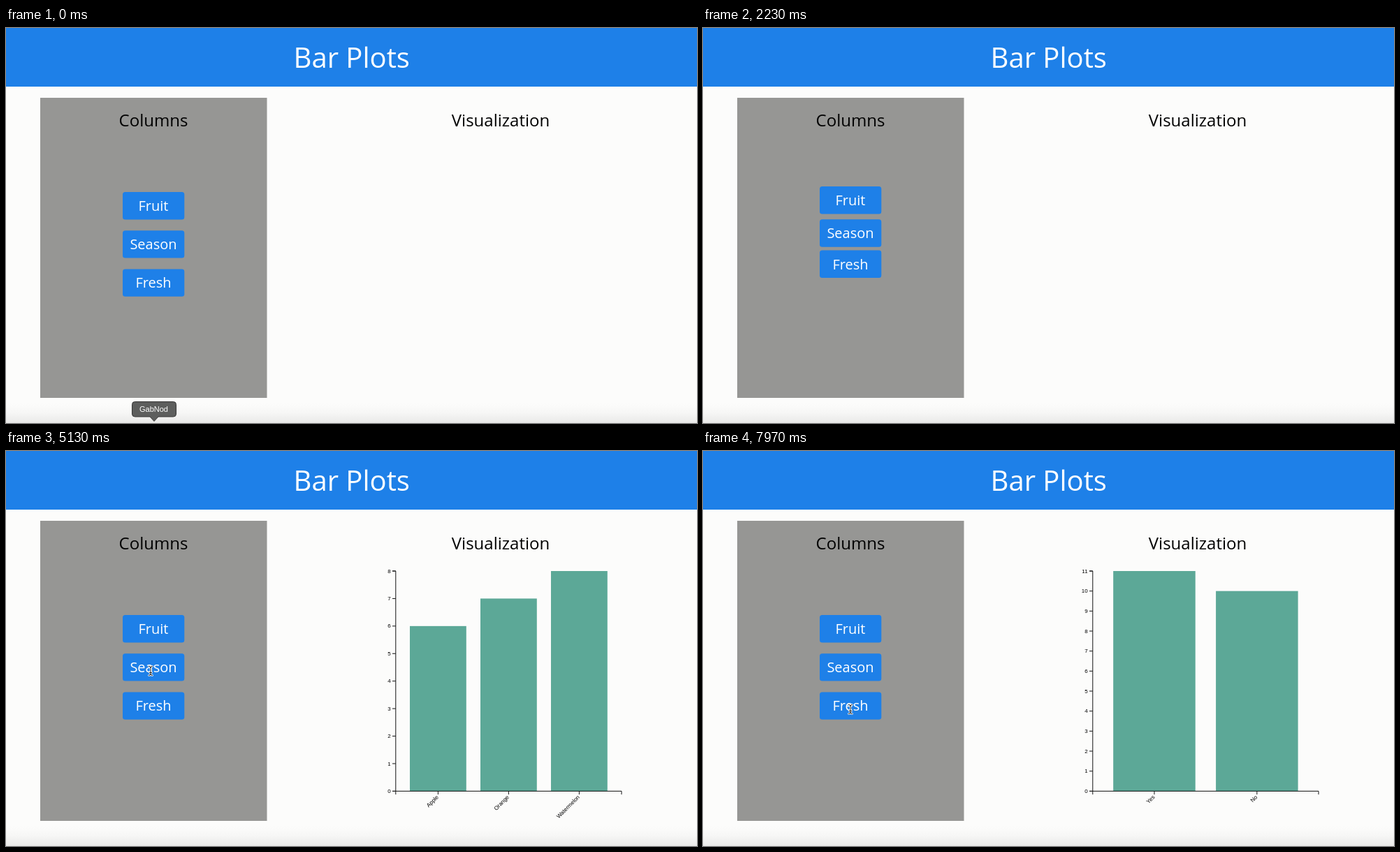
Animation, 989 px wide and 566 px high, one loop 8 s. Source, as an HTML page:

```html
<!DOCTYPE html>
<html lang="en">
<head>
<meta charset="utf-8">
<title>Bar Plots</title>
<style>
  html, body { margin: 0; width: 100%; height: 100%; overflow: hidden; background: #fcfcfb; }
  svg { display: block; width: 989px; height: 566px; }
  text { font-family: "Open Sans", "Noto Sans", sans-serif; text-anchor: middle; }
  .button text { font-size: 20px; fill: #fff; }
  .button rect { fill: #1e80e8; }
  .heading { font-size: 24px; }
  .system text, .chart text { font-family: "Liberation Sans", Arial, sans-serif; }
  .chart text { font-size: 8px; text-anchor: end; }
  .chart path { fill: none; stroke: #111; stroke-width: 1; }
  .chart rect { fill: #5ca897; }
</style>
</head>
<body>
<svg viewBox="0 0 989 566">
  <defs>
    <linearGradient id="floor" x2="0" y2="1">
      <stop offset="0" stop-color="#fcfcfb"/>
      <stop offset=".45" stop-color="#f7f7f6"/>
      <stop offset="1" stop-color="#e9e9e8"/>
    </linearGradient>
    <filter id="shadow" x="-10%" y="-100%" width="120%" height="300%">
      <feDropShadow dx="0" dy="0" stdDeviation="4" flood-opacity=".35"/>
    </filter>
  </defs>
  <rect width="989" height="566" fill="#fcfcfb"/>
  <rect y="538" width="989" height="28" fill="url(#floor)"/>
  <rect width="989" height="84" fill="#1e80e8"/>
  <text x="494.7" y="57" font-size="40" fill="#fff">Bar Plots</text>
  <rect x="49" y="100" width="324.5" height="430" fill="#969694"/>
  <text class="heading" x="211" y="141">Columns</text>
  <text class="heading" x="708" y="141">Visualization</text>
  <g id="buttons"></g>
  <g id="charts"></g>
  <g id="tooltip" class="system">
    <path d="M184.5 535.5H239.500a4 4 0 0 1 4 4V553a4 4 0 0 1 -4 4H218L212 563.500L206 557H184.500a4 4 0 0 1 -4 -4V539.500a4 4 0 0 1 4 -4Z" fill="#5d5e5d" stroke="#363636"/>
    <text x="211.5" y="550" font-size="11" fill="#fff">GabNod</text>
  </g>
  <g id="status" class="system">
    <path d="M-5 551.500H325a4 4 0 0 1 4 4V570H-5Z" fill="#17191d" filter="url(#shadow)"/>
    <text x="3" y="564" font-size="10" fill="#fff" style="text-anchor:start">Establishing secure connection...</text>
  </g>
  <g id="cursor">
    <g id="beam" fill="none" stroke-linecap="round">
      <path d="M-2.500 -6.500Q0 -6.500 0 -4.500Q0 -6.500 2.500 -6.500M0 -4.500V4.500M-2.500 6.500Q0 6.500 0 4.500Q0 6.500 2.500 6.500M-1.500 2.500H1.500" stroke="#fff" stroke-width="2.600"/>
      <path d="M-2.500 -6.500Q0 -6.500 0 -4.500Q0 -6.500 2.500 -6.500M0 -4.500V4.500M-2.500 6.500Q0 6.500 0 4.500Q0 6.500 2.500 6.500M-1.500 2.500H1.500" stroke="#222" stroke-width="1"/>
    </g>
    <path id="arrow" d="M0 0V13L3 10.200L5 15L7.200 14L5.200 9.500H9.300Z" fill="#000" stroke="#fff"/>
  </g>
</svg>
<script>
const LOOP = 8000;
const RELOAD = 1000;
const DROP = { start: 1718, length: 750, stagger: 100, distance: 79 };
const LABELS = ['Fruit', 'Season', 'Fresh'];
const CHARTS = [
  { from: 3550, to: 5250, bars: { Apple: 6, Orange: 7, Watermelon: 8 } },
  { from: 5250, to: 7300, bars: { Spring: 13, Summer: 8 } },
  { from: 7300, to: LOOP, bars: { Yes: 11, No: 10 } }
];
// time, x, y
const CURSOR = [
  [0, 212, 585], [30, 212, 575], [750, 85, -20], [2430, 500, -20], [2560, 492, 44],
  [2770, 219, 311], [3000, 219, 311], [3450, 202, 250], [4700, 202, 250],
  [5120, 207, 315], [6330, 207, 315], [7000, 211, 370], [LOOP, 211, 370]
];

const $ = id => document.getElementById(id);
const clamp = v => Math.min(1, Math.max(0, v));
const ramp = (t, start, length) => clamp((t - start) / length);
const show = (node, on) => { node.style.display = on ? '' : 'none'; };

$('buttons').innerHTML = LABELS.map((label, i) =>
  `<g class="button"><rect x="167" y="${235 + i * 55.2}" width="88.3" height="39.4" rx="3.5"/>
   <text x="211" y="${262 + i * 55.2}">${label}</text></g>`).join('');

function chartMarkup({ bars }) {
  const width = 323.2, height = 315.4;
  const entries = Object.entries(bars);
  const top = Math.max(...Object.values(bars));
  const step = width / (entries.length + 0.2);
  const y = v => height * (1 - v / top);
  let out = '';
  for (let v = 0; v <= top; v++) {
    out += `<path d="M-4.8 ${y(v)}H0"/><text x="-7.2" y="${y(v) + 2.6}">${v}</text>`;
  }
  entries.forEach(([name, v], i) => {
    const x = step * (i + 0.2), mid = x + step * 0.4;
    out += `<rect x="${x}" y="${y(v)}" width="${step * 0.8}" height="${height - y(v)}"/>
      <path d="M${mid} ${height}v4.800"/>
      <text transform="translate(${mid - 8} ${height}) rotate(-45)" y="12.9">${name}</text>`;
  });
  return `<g class="chart" transform="translate(557.8 172)">${out}
    <path d="M-4.800 0H0V${height}H-4.800M0 ${height + 4.8}V${height}H${width}v4.800"/></g>`;
}
$('charts').innerHTML = CHARTS.map(chartMarkup).join('');

const buttons = [...$('buttons').children];
const charts = [...$('charts').children];

function cursorAt(t) {
  const i = Math.max(1, CURSOR.findIndex(key => key[0] > t));
  const [t0, x0, y0] = CURSOR[i - 1], [t1, x1, y1] = CURSOR[i];
  const u = ramp(t, t0, t1 - t0), e = u * u * (3 - 2 * u);
  return [x0 + (x1 - x0) * e, y0 + (y1 - y0) * e];
}

function draw(t) {
  buttons.forEach((button, i) => {
    const left = 1 - ramp(t, DROP.start + i * DROP.stagger, DROP.length);
    const lift = t < RELOAD ? 0 : DROP.distance * left * left;
    button.setAttribute('transform', `translate(0 ${-lift})`);
  });
  charts.forEach((chart, i) => show(chart, t >= CHARTS[i].from && t < CHARTS[i].to));
  $('tooltip').style.opacity = 1 - ramp(t, 30, 80);
  $('status').style.opacity = ramp(t, 1050, 120) * (1 - ramp(t, 1730, 200));

  const [x, y] = cursorAt(t);
  const overText = Math.abs(x - 211) < 34 && [255, 310, 365].some(c => Math.abs(y - c) < 14);
  $('cursor').setAttribute('transform', `translate(${x} ${y})`);
  show($('beam'), overText);
  show($('arrow'), !overText);
}

function frame() {
  draw(performance.now() % LOOP);
  requestAnimationFrame(frame);
}
frame();
</script>
</body>
</html>
```
